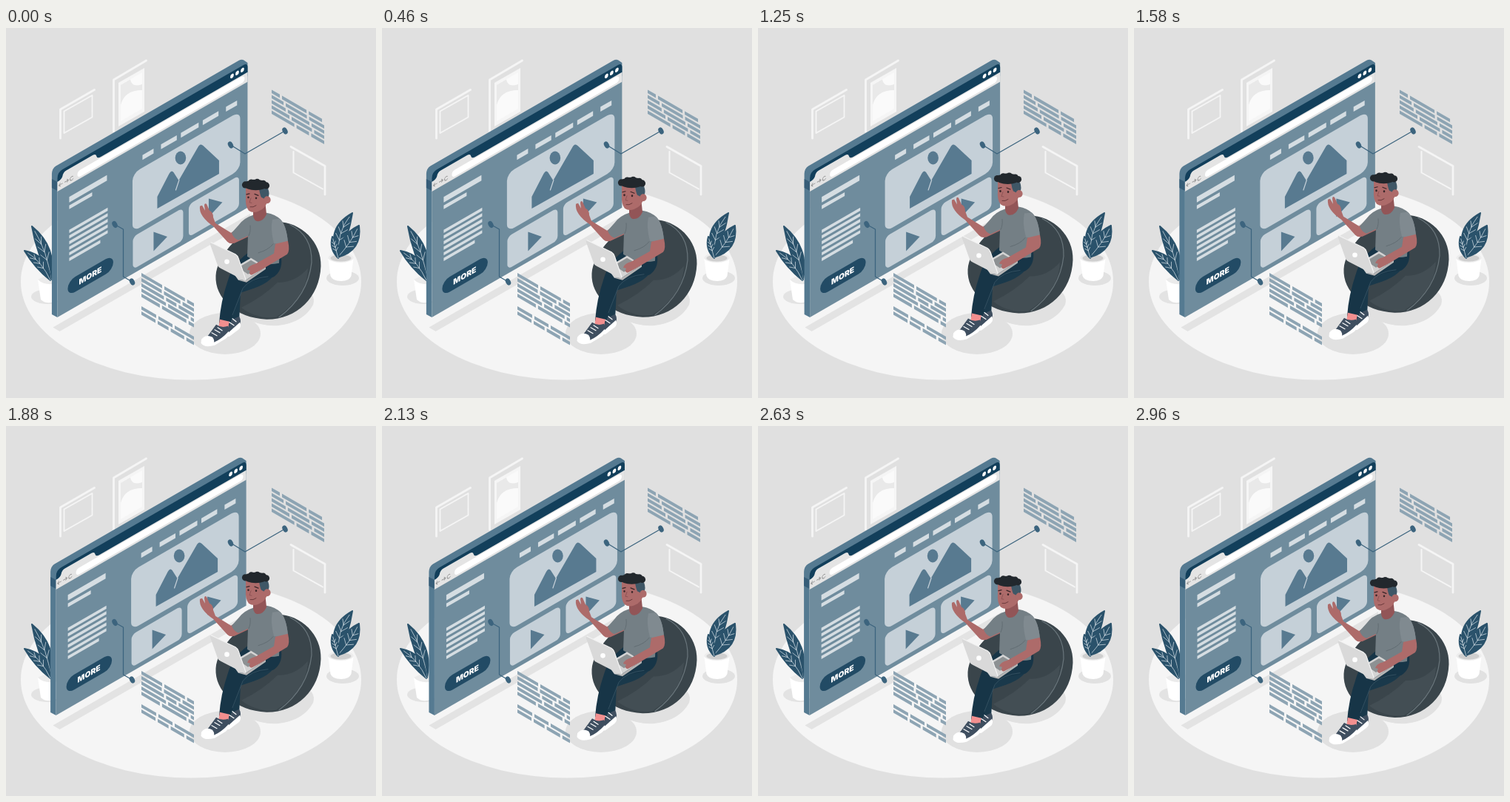
Animation of 500 by 500 pixels, one loop 3000 ms. Source, as an HTML page:

```html
<!DOCTYPE html>
<html lang="en">
<head>
<meta charset="utf-8">
<title>Isometric landing page</title>
<style>
  html, body { margin: 0; width: 100%; height: 100%; overflow: hidden; background: #e0e0e0; }
  svg { display: block; width: 100vw; height: 100vh; }
  .line { fill: none; stroke-linecap: round; stroke-linejoin: round; }
  .label { font: 900 10.3px Inter, "Open Sans", sans-serif; fill: #fff; text-anchor: middle; }
</style>
</head>
<body>
<svg viewBox="0 0 500 500">
  <rect width="500" height="500" fill="#e0e0e0"/>

  <!-- wall frames -->
  <g class="line" stroke="#f5f5f5" stroke-width="2.8">
    <path d="M73.500 149V110L119.500 83.500"/>
    <path d="M78.500 142V112.500L116.500 91V120.500Z" stroke-width="1.800"/>
    <path d="M145.500 140V70L189.500 44"/>
    <path d="M385 160.500L431 186.500V225"/>
    <path d="M388.500 167V195.500L428 217.500" stroke-width="2"/>
  </g>
  <path d="M152 74L187 54V113L152 133Z" fill="#f5f5f5"/>
  <path d="M155 77L184 60V109L155 126Z" fill="#fafafa"/>
  <path d="M155 77L168 69.500Q170 81 184 76V84Q160 84 155 104Z" fill="#e9e9e9"/>

  <!-- floor and shadows -->
  <ellipse cx="250" cy="342.700" rx="230" ry="132.800" fill="#f5f5f5"/>
  <path d="M63.500 404.500L72.500 410L330 262V251Z" fill="#e3e3e3"/>
  <ellipse cx="56" cy="363" rx="22" ry="10" fill="#e3e3e3"/>
  <ellipse cx="296" cy="413" rx="48" ry="28" fill="#e1e1e1"/>
  <path d="M300 372Q330 405 368 402Q402 398 415 374Q420 358 398 350Z" fill="#e1e1e1"/>
  <ellipse cx="455" cy="338" rx="22" ry="10" fill="#e1e1e1"/>

  <!-- left plant -->
  <path d="M43 340H74V366Q56 376 47 367Z" fill="#fff"/>
  <path d="M43 340Q54 333 72 337V344Q54 350 43 340Z" fill="#ebebeb"/>
  <g id="plantLeft"></g>

  <!-- browser -->
  <g id="browser">
    <path d="M69 391L61.500 387V197Q62 189.500 67 186.500L314 44Q318 42 321 43.500L326 47V65L75 211L69 216Z" fill="#557a91"/>
    <path d="M61.500 204L69 208V220L61.500 216Z" fill="#365d78"/>
    <g transform="matrix(1 -.577 0 1 69 391)">
      <path d="M0 0V-188Q0 -196 7 -196H251Q257 -196 257 -190V0Z" fill="#6f8c9d"/>
      <path d="M0 -183V-188Q0 -196 7 -196H251Q257 -196 257 -190V-183Z" fill="#123f5b"/>
      <path d="M0 -170V-183Q6 -183 7 -187Q8 -191.500 12 -191.500H48Q52 -191.500 53 -187Q54 -183 59 -183H257V-170Z" fill="#e4e4e4"/>
      <rect x="27" y="-181.500" width="226" height="9" rx="4.500" fill="#fff"/>
      <g fill="#fff" id="dots"></g>
      <g class="line" stroke="#8b8b8b" stroke-width=".8">
        <path d="M2 -177H7M4 -179L2 -177L4 -175M10 -177H15M13 -179L15 -177L13 -175"/>
        <path d="M21 -178.500A2.300 2.500 0 1 0 21.500 -175.500"/>
      </g>
      <g fill="#d5dde2" id="bars"></g>
      <g fill="#c5d0d8">
        <rect x="101.500" y="-136" width="145.500" height="79" rx="10"/>
        <rect x="102" y="-50" width="68" height="44" rx="6"/>
        <rect x="177.500" y="-50" width="68" height="44" rx="6"/>
      </g>
      <rect x="14" y="-41" width="61.500" height="20.500" rx="10.250" fill="#224b65"/>
      <text class="label" x="44.500" y="-27">MORE</text>
    </g>
    <g fill="#587a90">
      <path d="M204 244V228L220 197Q223 191 226 195L233 206L259 161Q262 155 266 159L287.500 179V197Z"/>
      <ellipse cx="235.500" cy="175.500" rx="7.300" ry="9"/>
      <path d="M199 275.500V301.500L217.500 282Z"/>
      <path d="M273.500 230.500V255.500L292 235.500Z"/>
    </g>
    <path d="M233.500 205.500L229 219" class="line" stroke="#c5d0d8" stroke-width="1.200"/>
  </g>

  <!-- callouts -->
  <g class="line" stroke="#3c647e" stroke-width="1.300">
    <path d="M303.500 158L323 170L377 139"/>
    <path d="M147 265.500L158.500 272V336L170.500 343"/>
  </g>
  <g fill="#3c647e" id="knobs"></g>
  <g fill="#8da4b3">
    <g id="copyRight" transform="matrix(1 .577 0 1 359 83.500)"></g>
    <g id="copyLow" transform="matrix(1 .577 0 1 183 331)"></g>
  </g>

  <!-- right plant -->
  <path d="M435.500 312L438.500 335Q441 342 453 342Q464 342 466.500 335L469.500 312Z" fill="#fff"/>
  <ellipse cx="452.500" cy="310.500" rx="17" ry="6.500" fill="#ededed"/>
  <ellipse cx="452.500" cy="311" rx="14" ry="4.500" fill="#cfcfcf"/>
  <g id="plantRight"></g>

  <!-- seated man -->
  <g id="man">
    <path d="M352 264C390 254 427 285 425.500 322C424 365 392 394.500 352 394C310 392 282 365 283.500 335C285 308 320 268 352 264Z" fill="#3a454b"/>
    <path d="M318 378Q347 364 367 344Q390 345 408 325Q407 364 365 391Q338 394 318 378Z" fill="#434e54"/>
    <path d="M384 266Q414 281 413 317Q408 362 369 391" class="line" stroke="#69757b" stroke-width="1.200"/>

    <!-- far leg and shoe -->
    <path d="M340 316L369 320Q364 342 335 352L317 358L315 397L302 401Q299 373 304 350Z" fill="#1a394b"/>
    <path d="M302 396L315 390Q319 396 315 403L302 416Q292 419 286 412Z" fill="#3f4f60"/>
    <path d="M316 398Q319 404 314 408L302 417Q297 418 297 415Z" fill="#fff"/>

    <!-- near leg and shoe -->
    <path d="M327 304L372 311Q374 329 361 337L333 342Q322 346 318 355L302 402L288 399Q290 370 300 341Q306 320 327 304Z" fill="#173547"/>
    <path d="M354 336Q330 338 320 352L306 388" class="line" stroke="#3a5666" stroke-width=".8"/>
    <path d="M289 394L302 397L300 406L287 406Z" fill="#f28f8f"/>
    <path d="M284 401Q291 406 300 403Q304 410 298 417L283 427Q270 432 264 424Q264 419 273 416Z" fill="#3f4f60"/>
    <path d="M264 421Q270 413 279 418Q282 422 281 425Q291 421 301 410Q302 416 297 420L282 429Q268 433 263.500 426Z" fill="#fff"/>
    <path d="M278 412L285 416M282 408L289 412M286 405L292 409M306 393L311 397M302 398L308 402" class="line" stroke="#fff" stroke-width="1.200"/>

    <!-- raised arm -->
    <path d="M325 264L330 281L313 289Q304 294 299 289L280 268Q271 262 266 255Q261 248 262 241L265 240L269 247L268 240Q268 236 271 238L275 247Q280 249 280 256L283 264L304 277Z" fill="#ad6b6a"/>

    <!-- torso -->
    <path d="M334 253Q321 257 314 267L305 277Q307 284 314 287L327 281L326 309Q346 323 369 318L370 295L381 290Q379 268 371 259Q364 252 352 250Z" fill="#747f85"/>
    <path d="M370 258Q379 266 381 290Q373 294 362 291Q357 272 360 259Z" fill="#808a90"/>
    <path d="M328 281Q331 275 330 267M361 292Q355 300 341 304" class="line" stroke="#626d73" stroke-width="1"/>

    <!-- head -->
    <path d="M334 246L350 233L352 252Q347 263 338 261Q334 258 334 253Z" fill="#925557"/>
    <path d="M324 216L348 216L354 231Q352 244 341 248Q334 251 328 247Q323 241 324 229Z" fill="#ad6b6a"/>
    <path d="M342 217H354Q357 225 354 230L349 231L345 229Q343 225 342 217Z" fill="#3f5766"/>
    <ellipse cx="353" cy="232.500" rx="4.600" ry="5" fill="#ad6b6a"/>
    <g fill="#22282d" id="curls"></g>
    <g class="line" stroke="#3a2629" stroke-width="1.200">
      <path d="M325 225L329 224M336 224.500L341 226.500"/>
      <path d="M331 230L329 236L332 236.500" stroke="#864d50" stroke-width=".8"/>
      <path d="M330 242Q334 243 338 240" stroke="#6c3b3d" stroke-width="1"/>
      <path d="M327.500 228.800V229.200M338 229.800V230.200" stroke-width="2.500"/>
    </g>

    <!-- laptop and typing arm -->
    <path d="M304 327L331 311L351 323L324 341L314 341Z" fill="#d4d4d4"/>
    <path d="M314 324L331 314L345 322L327 333Z" fill="#8d9193"/>
    <path d="M314 341L324 341L351 323V326L325 344Z" fill="#b5b5b5"/>
    <path d="M364 292L381 288Q384 301 380 306L350 324Q340 330 332 334Q327 333 330 328L326 327Q328 321 337 319L362 305Z" fill="#ad6b6a"/>
    <path d="M277 290Q275 290 276 293L286 321Q287 324 290 325L321 341Q325 343 324 339L314 311Q313 308 310 306Z" fill="#d9d9d9"/>
    <path d="M277 290L310 306Q313 308 314 311L324 340" class="line" stroke="#f3f3f3" stroke-width="1.200"/>
    <circle cx="298.500" cy="316" r="3.300" fill="#fff"/>
  </g>
</svg>
<script>
const NS = 'http://www.w3.org/2000/svg';
const get = id => document.getElementById(id);

function add(parent, tag, attrs) {
  const el = document.createElementNS(NS, tag);
  for (const key in attrs) el.setAttribute(key, attrs[key]);
  get(parent).appendChild(el);
}

const bar = (parent, x, y, width, height) => add(parent, 'rect', { x, y, width, height });

let seed = 7;
const random = () => (seed = seed * 16807 % 2147483647) / 2147483647;

// rows of word-like bars across a 71 wide column
function words(parent, top, rows) {
  for (let row = 0; row < rows; row++)
    for (let x = 0, width; x < 68; x += width + 3) {
      width = Math.min(11 + random() * 24, 71 - x);
      bar(parent, x, top + row * 7, width, 4.6);
    }
}

// curved leaf with a midrib and side veins
function leaf(parent, bx, by, tx, ty, spread, bend) {
  const dx = tx - bx, dy = ty - by, length = Math.hypot(dx, dy);
  const nx = -dy / length, ny = dx / length;
  const control = k => [(bx + tx) / 2 + nx * k, (by + ty) / 2 + ny * k];
  const at = (k, t) => {
    const [cx, cy] = control(k), s = 1 - t;
    return [s * s * bx + 2 * s * t * cx + t * t * tx, s * s * by + 2 * s * t * cy + t * t * ty];
  };
  add(parent, 'path', {
    d: `M${bx} ${by}Q${control(bend + spread)} ${tx} ${ty}Q${control(bend - spread)} ${bx} ${by}Z`,
    fill: '#2a526b', stroke: '#2a526b', 'stroke-width': 2, 'stroke-linejoin': 'round'
  });
  let veins = `M${bx} ${by}Q${control(bend)} ${at(bend, .9)}`;
  for (let t = .35; t < .7; t += .15)
    for (const side of [-1, 1])
      veins += `M${at(bend, t)}L${at(bend + side * spread * .8, t + .12)}`;
  add(parent, 'path', { d: veins, class: 'line', stroke: '#dfe7ec', 'stroke-width': .7 });
}

leaf('plantLeft', 61, 340, 35, 268, 15, 8);
leaf('plantLeft', 60, 341, 25, 301, 13, 8);
leaf('plantRight', 449, 309, 468, 250, 17, -12);
leaf('plantRight', 448, 310, 477, 267, 19, 4);
leaf('plantRight', 449, 311, 441, 282, 9, 0);

bar('bars', 16, -153.5, 51, 7.5);
bar('bars', 16, -142, 31, 5);
for (let i = 0; i < 6; i++) bar('bars', 16, -109 + i * 7.6, i < 5 ? 52 : 42, 4.2);
for (let i = 0; i < 5; i++) {
  const width = 15 + 9 * Math.sin(i / 4 * Math.PI);
  bar('bars', 122.5 + i * 28.2 - width / 2, -153, width, 6.5);
}
words('copyRight', 0, 5);
words('copyLow', 0, 5);
words('copyLow', 45, 2);

for (let i = 0; i < 3; i++)
  add('dots', 'ellipse', { cx: 236 + i * 7, cy: -190, rx: 2.4, ry: 2.8 });
for (const [cx, cy] of [[303.5, 158], [377, 139], [147, 265.5], [170.5, 343]])
  add('knobs', 'ellipse', { cx, cy, rx: 3.3, ry: 4.8, transform: `rotate(-28 ${cx} ${cy})` });
for (let i = 0; i < 8; i++)
  add('curls', 'circle', { cx: 323.5 + i * 4, cy: 213 - 4.5 * Math.sin((i + .5) / 8 * Math.PI) + i % 2, r: 4.6 });
add('curls', 'ellipse', { cx: 337.5, cy: 213.5, rx: 15, ry: 6 });

const LOOP = 3000, STEP = 1000 / 24, SHAKE = 1500, RISE = 10;

// alternating swings that double up to 4, mirrored in time
const swing = k => k ? (-1) ** k * Math.min(4, 2 ** (k - 1)) : 0;

function shake(t) {
  const p = 5 - Math.abs((t % SHAKE) / SHAKE * 10 - 5), k = Math.floor(p);
  return swing(k) + (swing(k + 1) - swing(k)) * (p - k);
}

const rise = t => -RISE * (1 - Math.abs(1 - t / (LOOP / 2)));

function draw(now) {
  // hold each pose for one 24 fps step
  const t = (Math.floor((now + 5) / STEP) * STEP + 25) % LOOP;
  get('browser').setAttribute('transform', `translate(${shake(t) + .6} 0)`);
  get('man').setAttribute('transform', `translate(0 ${rise(t)})`);
}

const start = performance.now();
function tick() {
  draw(performance.now() - start);
  requestAnimationFrame(tick);
}
tick();
</script>
</body>
</html>
```
